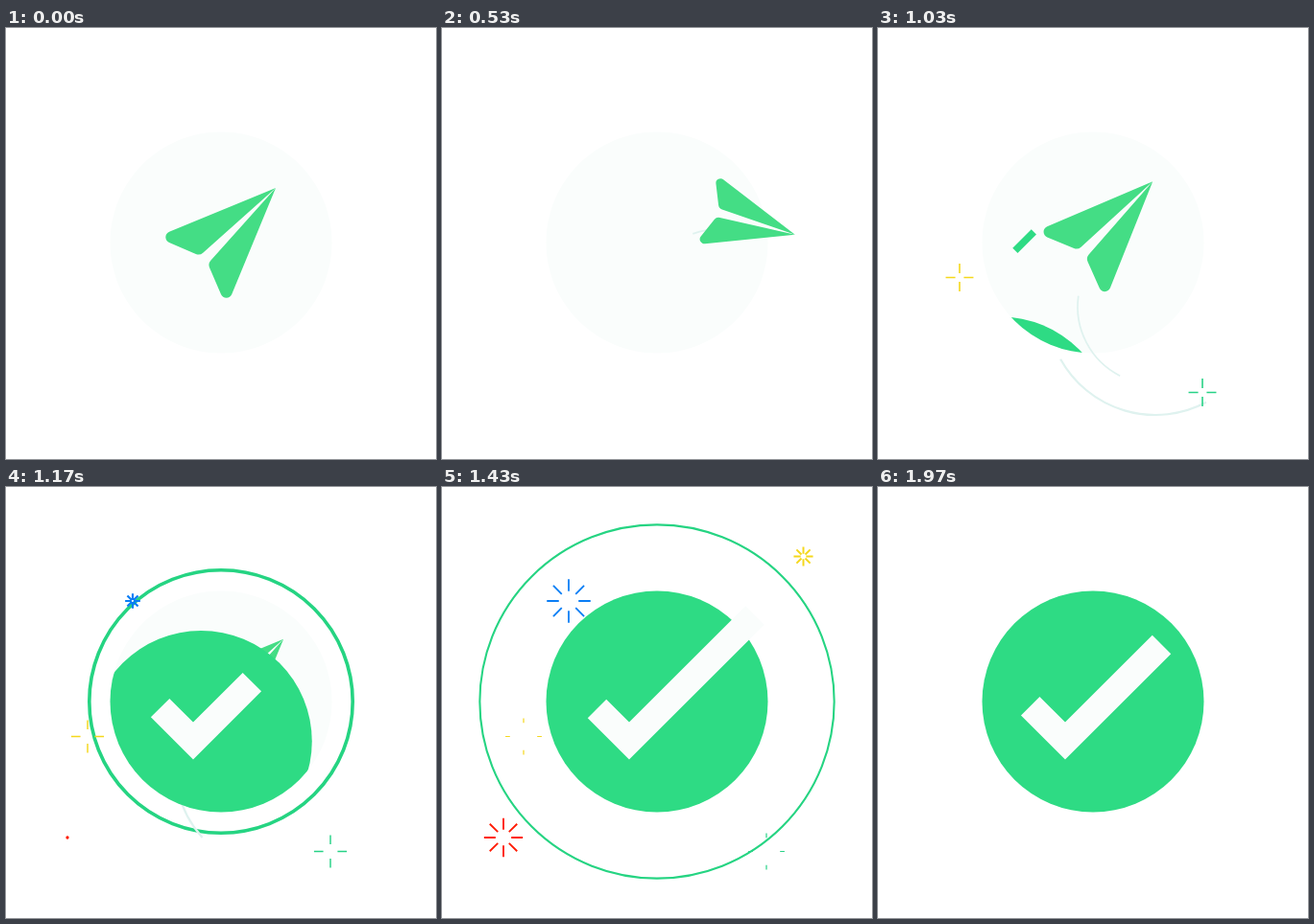
These frames come from a looping animation (448 by 450 pixels, 2010 ms). An HTML page with a canvas:

```html
<!DOCTYPE html>
<html lang="en">
<head>
<meta charset="utf-8">
<title>Message sent</title>
<style>
html, body { margin: 0; width: 100%; height: 100%; overflow: hidden; background: #fff; }
canvas { display: block; }
</style>
</head>
<body>
<canvas id="stage" width="448" height="450"></canvas>
<script>
const ctx = document.getElementById('stage').getContext('2d');
const LOOP = 2010, TAU = Math.PI * 2, RAD = Math.PI / 180;
const MID = 224, R = 115.5, ORBIT = 93;
const GREEN = [46, 219, 132], PALE = [250, 253, 252];
const PLANE = '#44dd85', TRAIL = '#dff2ef';

const rgb = c => `rgb(${c})`;
const phase = (t, a, b) => Math.min(1, Math.max(0, (t - a) / (b - a)));
const easeOut = u => 1 - (1 - u) ** 3;
const ease = (t, a, b) => {
  const u = phase(t, a, b);
  return u * u * (3 - 2 * u);
};

const turn = t => ease(t, 360, 1050);
const orbit = t => -135 + 360 * turn(t);
const windup = t => ease(t, 0, 330) - ease(t, 345, 440);

function stroke(color, width) {
  ctx.strokeStyle = color;
  ctx.lineWidth = width;
  ctx.stroke();
}

function disc(x, y, r) {
  ctx.beginPath();
  ctx.arc(x, y, r, 0, TAU);
}

function drawRing(t) {
  const u = phase(t, 1103, 1787);
  if (u === 0 || u === 1) return;
  disc(MID, MID, R + 80.5 * easeOut(u));
  stroke('#25d482', 4 * (1 - u));
}

// The pale disc is pulled to the right while the plane flies past
function drawBase(t) {
  const b = Math.sin(Math.PI * phase(t, 550, 900));
  const c = R * 0.5523, pull = c * (1 - 0.35 * b);
  const left = MID - R, right = MID + R + 20.5 * b;
  const y = MID - 2 * b, h = R - 5.5 * b;
  ctx.beginPath();
  ctx.moveTo(MID, y - h);
  ctx.bezierCurveTo(MID + c, y - h, right, y - pull, right, y);
  ctx.bezierCurveTo(right, y + pull, MID + c, y + h, MID, y + h);
  ctx.bezierCurveTo(MID - c, y + h, left, y + c, left, y);
  ctx.bezierCurveTo(left, y - c, MID - c, y - h, MID, y - h);
  ctx.fillStyle = rgb(PALE);
  ctx.fill();
}

function trail(r, from, to, width) {
  if (to <= from) return;
  ctx.beginPath();
  ctx.arc(289, 291, r, from * RAD, to * RAD);
  stroke(TRAIL, width);
}

function drawTrails(t) {
  const p = t < 730 ? Math.min(orbit(t), 62) : 62 + 0.545 * (t - 730);
  const lag = 20 + 18 * phase(t, 730, 1030);
  trail(113, Math.max(p - 164, -105), Math.min(p - 75, 195), 2.2);
  trail(81, Math.max(p - 109, -110), Math.min(p - lag, 215), 1.7);
}

// Thin outline left where the plane stood, mirrored about its heading
function echo(x, y, tipX, tipY, gap) {
  ctx.beginPath();
  ctx.moveTo(MID + x, MID + y);
  ctx.lineTo(MID + tipX, MID + tipY);
  ctx.lineTo(MID - y, MID - x);
  ctx.lineTo(MID + tipX - gap, MID + tipY + gap);
  ctx.closePath();
  ctx.fillStyle = PLANE;
  ctx.fill();
  stroke(PLANE, 0.4);
}

function drawEchoes(t) {
  if (t > 430) return;
  if (t > 90) echo(-57, -10, 57, -57, 3.6);
  if (t > 240) echo(-67, 1.5, 29, -28, 2.6);
}

function wing(mirror) {
  const p = (x, y) => mirror ? [-y, -x] : [x, y];
  const tip = p(57, -57), tail = p(-67.3, -5.7), fold = p(-22.1, 13.7);
  ctx.beginPath();
  ctx.moveTo(...tip);
  ctx.arcTo(...tail, ...fold, 6.1);
  ctx.arcTo(...fold, ...tip, 7);
  ctx.fill();
}

function drawPlane(t) {
  if (t > 1400) return;
  const a = orbit(t) * RAD, far = Math.sin(Math.PI * turn(t)), wind = windup(t);
  const heading = a + (90 + 12 * far) * RAD;
  const push = 11.5 * ease(t, 930, 1060) - 35 * wind;
  const pivot = MID + ORBIT * Math.SQRT1_2;
  ctx.save();
  ctx.translate(
    pivot + ORBIT * Math.cos(a) + push * Math.cos(heading),
    pivot + ORBIT * Math.sin(a) + push * Math.sin(heading));
  ctx.rotate(heading);
  ctx.scale(1 - 0.45 * far - 0.243 * wind, 1 - 0.525 * far - 0.015 * wind);
  ctx.rotate(TAU / 8);
  ctx.fillStyle = PLANE;
  wing(false);
  wing(true);
  ctx.restore();
}

// Green disc slides in from below, seen only inside the pale one
function drawFill(t) {
  if (t < 1015) return;
  const rest = 1.15 * (1 - phase(t, 1015, 1380)) ** 3;
  ctx.save();
  if (rest > 0) {
    disc(MID, MID, R);
    ctx.clip();
  }
  disc(MID - 96 * rest, MID + 192 * rest, R);
  ctx.fillStyle = rgb(GREEN);
  ctx.fill();
  ctx.restore();
}

function drawTick(t) {
  const bend = 45;
  const start = 11.5 * ease(t, 1030, 1200) - 2.8 * ease(t, 1450, 1700);
  const end = 176 * ease(t, 1000, 1300) - 30.5 * ease(t, 1450, 1720);
  if (end <= start) return;
  const to = d => ctx.lineTo(150 + d, 265 - Math.abs(d - bend));
  ctx.beginPath();
  to(start);
  if (end > bend) to(bend);
  to(end);
  const u = phase(t, 1040, 1150);
  stroke(rgb(GREEN.map((c, i) => Math.round(c + (PALE[i] - c) * u))), 27.5);
}

function spark(t, x, y, color, rays, size, start, end) {
  const u = phase(t, start, end);
  if (u === 0 || u === 1) return;
  const outer = size * easeOut(u), inner = size * u ** 1.5;
  ctx.beginPath();
  for (let i = 0; i < rays; i++) {
    const a = i / rays * TAU, c = Math.cos(a), s = Math.sin(a);
    ctx.moveTo(x + c * inner, y + s * inner);
    ctx.lineTo(x + c * outer, y + s * outer);
  }
  stroke(color, 1.6 + rays / 12 - 0.9 * u);
}

const cross = (t, x, y, color) => spark(t, x, y, color, 4, 19, 690, 1590);
const star = (t, x, y, color, size, start) => spark(t, x, y, color, 8, size, start, 1700);

function drawSparks(t) {
  cross(t, 85, 260.5, '#f5d81c');
  cross(t, 338, 380.5, '#27d286');
  star(t, 132, 119, '#0a7df5', 25, 1100);
  star(t, 64, 366, '#ff1a00', 23, 1160);
  star(t, 376.5, 72.5, '#f5d81c', 14, 1290);
}

const layers = [drawRing, drawBase, drawTrails, drawEchoes, drawPlane, drawFill, drawTick, drawSparks];
const begin = performance.now();

function frame() {
  const t = (performance.now() - begin) % LOOP;
  ctx.clearRect(0, 0, 448, 450);
  layers.forEach(layer => layer(t));
  requestAnimationFrame(frame);
}
frame();
</script>
</body>
</html>
```
